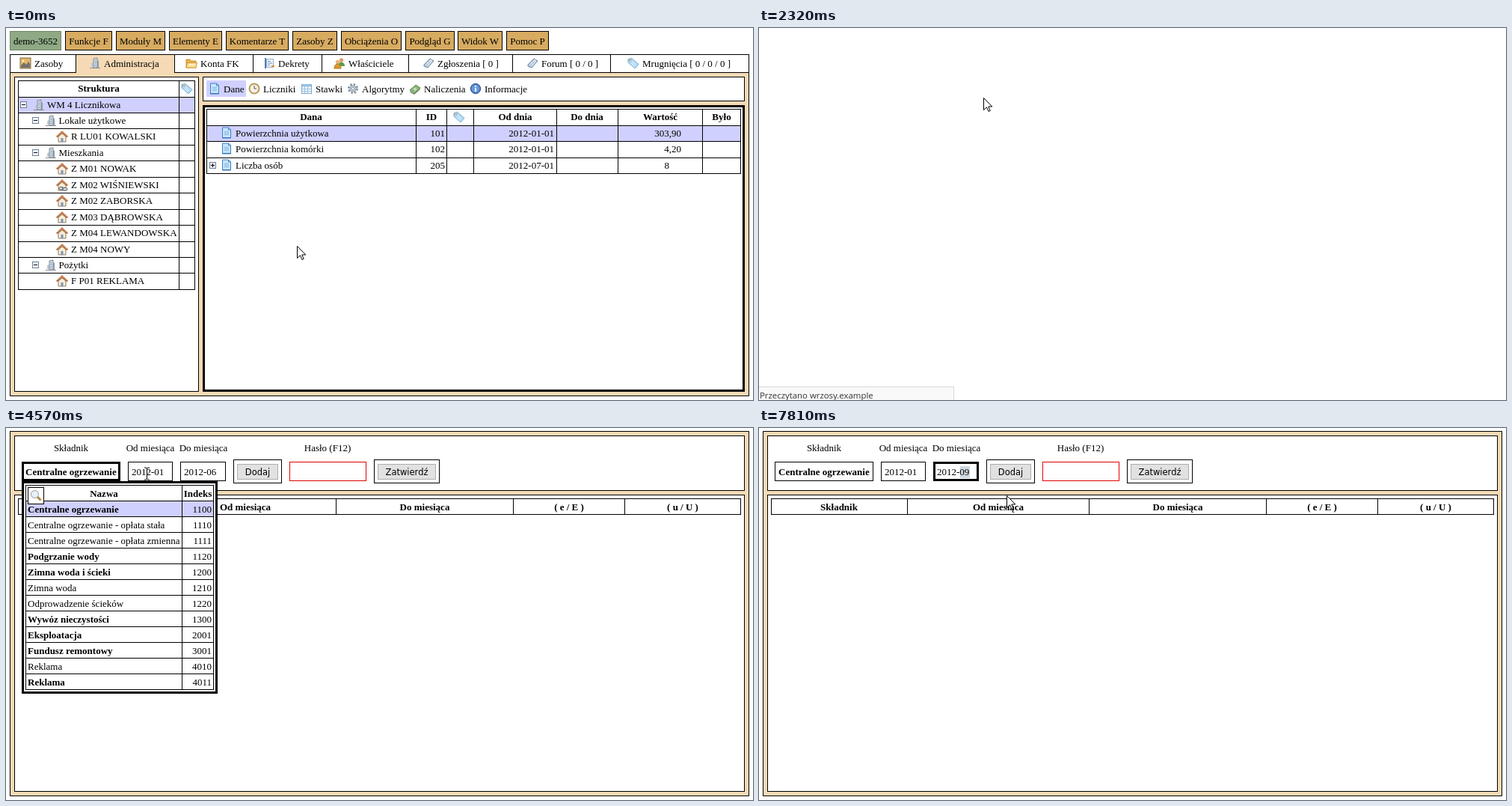
Write an HTML page that moves like this. It is 999 by 497 pixels and loops after 8000 ms.

```html
<!DOCTYPE html>
<html lang="pl">
<head>
<meta charset="utf-8">
<style>
html, body { margin: 0; width: 100%; height: 100%; overflow: hidden; background: #fff; }
svg { display: block; }
text { font: 13px "Liberation Serif", "Times New Roman", serif; white-space: pre; }
.b { font-weight: bold; }
.ui { font: 11.5px "DejaVu Sans", sans-serif; }
.status { font: 11.4px "Open Sans", sans-serif; fill: #333; }
.m { text-anchor: middle; }
.e { text-anchor: end; }
</style>
</head>
<body>
<svg id="stage" width="999" height="497" viewBox="0 0 999 497"></svg>
<script>
const PEACH = '#f5dab5', LILAC = '#d0d0ff', TAN = '#d7ab60';

const icons = {
  building: '<path d="M1 14.5h14" stroke="#8a9098"/><path d="M3 13V8l3-1v6z" fill="#c3cad2"/><path d="M6 14V2l5-1v13z" fill="#dfe6ee" stroke="#7c8794"/><path d="M11 14V4l2 1v9z" fill="#8d99a8"/><path d="M7.5 4h2m-2 2.500h2m-2 2.500h2m-2 2.500h2" stroke="#5d7ea8"/>',
  house: '<path d="M3 8v7h10V8L8 4z" fill="#f6ecd8" stroke="#8f7b62"/><path d="M.8 8.500L8 1.800l7.200 6.700" fill="none" stroke="#a8572b" stroke-width="2.200"/><path d="M1.500 7.600L8 1.600l6.500 6" fill="none" stroke="#e9a15d"/><path d="M6.500 10h3v5h-3z" fill="#7b93b4"/>',
  houseLink: '<use href="#house"/><rect x="4" y="10.500" width="5" height="3.500" rx="1.700" fill="#ddd" stroke="#555"/><rect x="9" y="11.500" width="6" height="3.500" rx="1.700" fill="#ddd" stroke="#555"/>',
  folder: '<path d="M1 3h5l1 2h7v9H1z" fill="#e9b24c" stroke="#c58f31"/><path d="M2.500 7.500h13l-1.500 6.500H1z" fill="#fbdf92" stroke="#d29b3c"/><path d="M5 10h7" stroke="#fff"/>',
  doc: '<path d="M2.500 1h8l3 3v11h-11z" fill="#c7e4fb" stroke="#3b82c4"/><path d="M10.500 1v3h3z" fill="#fff" stroke="#3b82c4"/><path d="M5 6.500h6M5 8.500h6M5 10.500h6" stroke="#84b8e0"/><path d="M2 14.500h12" stroke="#3171b0"/>',
  clock: '<circle cx="8" cy="8" r="6.500" fill="#f5f1e6" stroke="#b99a5a" stroke-width="2"/><path d="M8 4v4h3" fill="none" stroke="#555"/>',
  sheet: '<rect x="1.500" y="2.500" width="13" height="12" fill="#f2f8fd" stroke="#79a9d2"/><path d="M2 4h12" stroke="#9cc4e6" stroke-width="3"/><path d="M2 8.500h12m-12 3h12M5.500 3v11m4-11v11" stroke="#9dbfdd"/>',
  gear: '<circle cx="8" cy="8" r="5.600" fill="none" stroke="#8a97a4" stroke-width="3" stroke-dasharray="2.400 2"/><circle cx="8" cy="8" r="4" fill="#cfd8e0" stroke="#8a97a4"/><circle cx="8" cy="8" r="1.700" fill="#fff" stroke="#8a97a4"/>',
  money: '<path d="M1 10l8-7 6 4-8 8z" fill="#8bb67a" stroke="#5d8b50"/><path d="M1 12l6 3.500 8-7" fill="none" stroke="#76736a"/><circle cx="8" cy="8.800" r="2" fill="#c8dfbd"/>',
  info: '<circle cx="8" cy="8" r="6.700" fill="#4a7fc4" stroke="#2d5594"/><circle cx="8" cy="8" r="5" fill="#6d9bd8"/><path d="M8 7v5M8 4v1.700" stroke="#fff" stroke-width="2"/>',
  tag: '<path d="M1 2.500l5-1 9 8-5 5.500-9-8z" fill="#b5daf4" stroke="#76afd8"/><path d="M6 6l5 4.500M5 8l4 4" stroke="#e8f5fd"/><circle cx="3.500" cy="4" r="1.200" fill="#fff" stroke="#b58a50"/>',
  clip: '<path d="M2 10l8-8 5 3-8 9-5-2z" fill="#b9c9da" stroke="#6b86a5"/><path d="M5 10l5-5m-3 7l5-6" stroke="#eef3f8"/><circle cx="11.500" cy="4.500" r="1" fill="#fff"/>',
  people: '<circle cx="10.500" cy="4" r="2.700" fill="#d9a066"/><path d="M6 12c0-7 9-7 9 0z" fill="#5e9a4c"/><circle cx="5.500" cy="6.500" r="2.700" fill="#e8b67c"/><path d="M1 15c0-8 9-8 9 0z" fill="#d99a2b" stroke="#a87422"/>',
  book: '<path d="M2 1h2v14H2z" fill="#4f7fb5"/><path d="M4.500 2.500h9v11h-9z" fill="#eef4fa" stroke="#98afc6"/><path d="M6 5.500h4M6 8h6M6 10.500h3" stroke="#6c92ba"/><path d="M11 12h4" stroke="#e2942f" stroke-width="2"/>',
  picture: '<rect x="1" y="1" width="14" height="14" fill="#e5b567" stroke="#7f6a48"/><path d="M2 11l4-4 3 3 3-4 2 3v5H2z" fill="#74716c"/><circle cx="5" cy="5" r="1.500" fill="#fff3c4"/>',
  lens: '<path d="M9.500 9.500l5 5" stroke="#b98443" stroke-width="3"/><circle cx="6.500" cy="6.500" r="5" fill="#e6f1fa" stroke="#999"/>',
  add: '<circle cx="12" cy="12" r="3.800" fill="#4aa83c"/><path d="M9.500 12h5M12 9.500v5" stroke="#fff" stroke-width="1.400"/>'
};

const rect = (x, y, x2, y2, fill) =>
  `<rect x="${x}" y="${y}" width="${x2 - x}" height="${y2 - y}" fill="${fill}"/>`;
const box = (x, y, x2, y2, fill = '#fff', w = 1, line = '#000') =>
  rect(x, y, x2, y2, line) + rect(x + w, y + w, x2 - w, y2 - w, fill);
const text = (x, y, s, cls = '', attrs = '') =>
  `<text x="${x}" y="${y}" class="${cls}" ${attrs}>${s}</text>`;
const icon = (name, x, y) => `<use href="#${name}" x="${x}" y="${y}"/>`;
const vline = (x, y, y2) => rect(x, y, x + 1, y2, '#000');
const hline = (x, x2, y) => rect(x, y, x2, y + 1, '#000');
const grid = (xs, ys) =>
  xs.map(x => vline(x, ys[0], ys.at(-1) + 1)).join('') +
  ys.map(y => hline(xs[0], xs.at(-1) + 1, y)).join('');
const lines = (y, n, step) => Array.from({ length: n + 1 }, (_, i) => Math.floor(y + i * step));
const group = (id, body) => `<g id="${id}">${body}</g>`;
const toggle = (x, y, plus) =>
  box(x, y, x + 9, y + 9, '#f4f6fa', 1, '#6f7f95') + hline(x + 2, x + 7, y + 4) +
  (plus ? vline(x + 4, y + 2, y + 7) : '');

function buttonBar() {
  const items = [[79, 142, 'Funkcje F'], [147, 213, 'Moduły M'], [218, 289, 'Elementy E'],
    [294, 378, 'Komentarze T'], [383, 443, 'Zasoby Z'], [448, 529, 'Obciążenia O'],
    [534, 600, 'Podgląd G'], [604, 664, 'Widok W'], [669, 726, 'Pomoc P']];
  return box(5, 4, 74, 30, '#8fa985', 1, '#71866a') + text(39.5, 22, 'demo-3652', 'm') +
    items.map(([a, b, s]) => box(a, 4, b, 30, TAN) + text((a + b) / 2, 22, s, 'm')).join('');
}

function tabs() {
  const items = [[5, 'picture', 18, 'Zasoby'], [93, 'building', 111, 'Administracja'],
    [225, 'folder', 240, 'Konta FK'], [330, 'book', 344, 'Dekrety'],
    [422, 'people', 438, 'Właściciele'], [538, 'clip', 557, 'Zgłoszenia [ 0 ]'],
    [677, 'clip', 696, 'Forum [ 0 / 0 ]'], [808, 'tag', 831, 'Mrugnięcia [ 0 / 0 / 0 ]']];
  return box(5, 35, 994, 60) + box(5, 59, 994, 492, PEACH) + rect(94, 36, 225, 61, PEACH) +
    items.map(([x, ic, ix, s]) => vline(x, 35, 60) + icon(ic, ix, 39) + text(ix + 20, 52, s)).join('');
}

function tree() {
  const rows = [[0, 'WM 4 Licznikowa'], [1, 'Lokale użytkowe'], [2, 'R LU01 KOWALSKI'],
    [1, 'Mieszkania'], [2, 'Z M01 NOWAK'], [2, 'Z M02 WIŚNIEWSKI'], [2, 'Z M02 ZABORSKA'],
    [2, 'Z M03 DĄBROWSKA'], [2, 'Z M04 LEWANDOWSKA'], [2, 'Z M04 NOWY'],
    [1, 'Pożytki'], [2, 'F P01 REKLAMA']];
  const ys = lines(92, 12, 21.45);
  return box(11, 65, 258, 486) + rect(16, 92, 253, 113, LILAC) + grid([16, 231, 252], [70, ...ys]) +
    text(124, 85, 'Struktura', 'b m') + icon('tag', 234, 73) +
    rows.map(([level, s], i) => {
      const y = ys[i], x = 36 + level * 15.5;
      return (level < 2 ? toggle(Math.round(x) - 17, y + 6) : '') +
        icon(level < 2 ? 'building' : i == 5 ? 'houseLink' : 'house', Math.round(x), y + 3) +
        text([55, 70.5, 87][level], y + 15, s);
    }).join('');
}

function dataView() {
  const tools = [['doc', 271, 'Dane'], ['clock', 324, 'Liczniki'], ['sheet', 394, 'Stawki'],
    ['gear', 456, 'Algorytmy'], ['money', 539, 'Naliczenia'], ['info', 620, 'Informacje']];
  const heads = [[408, 'Dana'], [569, 'ID'], [681, 'Od dnia'], [777, 'Do dnia'], [875, 'Wartość'], [957, 'Było']];
  const rows = [['Powierzchnia użytkowa', 101, '2012-01-01', '303,90', 903],
    ['Powierzchnia komórki', 102, '2012-01-01', '4,20', 903],
    ['Liczba osób', 205, '2012-07-01', '8', 887]];
  const ys = [130, 151, 173, 194];
  return box(263, 65, 988, 98) + rect(268, 70, 321, 92, LILAC) +
    tools.map(([ic, x, s]) => icon(ic, x, 73) + text(x + 20, 86, s)).join('') +
    box(263, 103, 988, 486, '#fff', 3) + rect(268, 130, 983, 151, LILAC) +
    grid([268, 548, 589, 625, 736, 818, 931, 982], [108, ...ys]) +
    heads.map(([x, s]) => text(x, 123, s, 'b m')).join('') + icon('tag', 598, 111) +
    rows.map(([name, id, date, value, end], i) => {
      const y = ys[i] + 15;
      return icon('doc', 287, y - 13) + text(307, y, name) + text(587, y, id, 'e') +
        text(733, y, date, 'e') + text(end, y, value, 'e');
    }).join('') + toggle(272, 179, true);
}

function menu() {
  const rows = [['folder', 'Konta należności', 'K'], ['money', 'Terminy rozliczeń liczników', 'L'],
    ['money', 'Terminy rozliczeń kosztów', 'R'], ['folder', 'Konta bankowe', 'B'],
    ['money', 'Terminy płatności', 'T'], ['book', 'Nazwy dokumentów', 'O'],
    ['gear', 'Nazwy typów należności', 'Y'], ['people', 'Konta kontrahentów', 'H']];
  const ys = lines(35, 8, 21.55);
  return box(217, 30, 437, 213) + grid([222, 416, 431], ys) +
    rows.map(([ic, s, key], i) => icon(ic, 225, ys[i] + 4) + (ic == 'book' ? '' : icon('add', 225, ys[i] + 4)) +
      text(245, ys[i] + 16, s) + text(424, ys[i] + 16, key, 'm')).join('');
}

function form() {
  const labels = [[87, 'Składnik'], [193, 'Od miesiąca'], [264, 'Do miesiąca'], [430, 'Hasło (F12)']];
  const heads = [[107, 'Składnik'], [320, 'Od miesiąca'], [560, 'Do miesiąca'], [753, '( e / E )'], [905, '( u / U )']];
  const button = (x, x2, s) => box(x, 42, x2, 74) + box(x + 5, 48, x2 - 5, 69, '#e1e1e1', 1, '#adadad') +
    text((x + x2) / 2, 63, s, 'ui m');
  const field = (id, x, x2) => box(x, 45, x2, 71) + group(id, box(x, 45, x2, 71, '#fff', 3));
  return box(5, 4, 994, 492, PEACH) + box(11, 10, 988, 84) + box(11, 89, 988, 486) +
    labels.map(([x, s]) => text(x, 31, s, 'm')).join('') +
    field('focusPart', 21, 153) + text(26, 63, 'Centralne ogrzewanie', 'b') +
    field('focusFrom', 163, 223) + group('pickFrom', rect(198, 51, 211, 67, '#d0d8e0')) + text(168, 63, '2012-01') +
    field('focusTo', 233, 294) + group('pickTo', rect(269, 51, 282, 67, '#d0d8e0')) + text(238, 63, '2012-06', '', 'id="to"') +
    button(304, 369, 'Dodaj') + box(379, 45, 482, 71, '#fff', 1, '#e00000') + button(492, 580, 'Zatwierdź') +
    grid([16, 198, 441, 678, 827, 982], [94, 115]) +
    heads.map(([x, s]) => text(x, 110, s, 'b m')).join('');
}

function picker() {
  const rows = [['Centralne ogrzewanie', 1100, 'b'], ['Centralne ogrzewanie - opłata stała', 1110],
    ['Centralne ogrzewanie - opłata zmienna', 1111], ['Podgrzanie wody', 1120, 'b'],
    ['Zimna woda i ścieki', 1200, 'b'], ['Zimna woda', 1210], ['Odprowadzenie ścieków', 1220],
    ['Wywóz nieczystości', 1300, 'b'], ['Eksploatacja', 2001, 'b'], ['Fundusz remontowy', 3001, 'b'],
    ['Reklama', 4010], ['Reklama', 4011, 'b']];
  const ys = lines(97, 12, 21);
  return box(21, 71, 283, 355, '#fff', 3) + rect(26, 97, 278, 118, LILAC) + grid([26, 235, 277], [76, ...ys]) +
    text(131, 92, 'Nazwa', 'b m') + text(256.5, 92, 'Indeks', 'b m') +
    rows.map(([s, n, cls], i) => text(29, ys[i] + 16, s, cls) + text(275, ys[i] + 16, n, 'e')).join('') +
    group('search', box(29, 79, 51, 102) + icon('lens', 32, 82));
}

const stage = document.getElementById('stage');
stage.innerHTML =
  '<defs>' + Object.entries(icons).map(([id, body]) => group(id, body)).join('') + '</defs>' +
  group('main', buttonBar() + tabs() + tree() + dataView() + group('menu', menu())) +
  group('entry', form() + group('picker', picker())) +
  group('status', box(-1, 479, 261, 499, '#f9f9f9', 1, '#d8d8d8') + text(1, 495, 'Przeczytano wrzosy.example', 'status')) +
  group('cursor',
    group('ring', '<circle r="11" fill="none" stroke="#000" stroke-width="1.500"/><circle r="9.800" fill="none" stroke="#fff"/>') +
    group('arrow', '<path d="M.5.5v16l4-3.700 2.500 5.700 2.200-1-2.400-5.500h5z" fill="#fff" stroke="#000"/>') +
    group('beam', '<path d="M-3.500-7.500h2.500l1 1 1-1h2.500M0-6.500v14M-3.500 8.500h2.500l1-1 1 1h2.500" transform="translate(.5 -.5)" fill="none" stroke="#000"/>'));

const part = {};
stage.querySelectorAll('[id]').forEach(el => part[el.id] = el);
const show = (id, on) => part[id].style.display = on ? '' : 'none';

// first step, last step, step count, goal x, goal y
const moves = [
  [70, 690, 9, 261, 10], [840, 840, 1, 267, 22], [1390, 1850, 7, 302, 94],
  [2320, 2320, 1, 300, 93], [3020, 3330, 5, 149, 103], [3405, 3560, 3, 136, 108],
  [4110, 4570, 7, 188, 61], [4650, 4650, 1, 185, 60], [4800, 4960, 3, 202, 60],
  [5490, 6180, 10, 277, 58], [6590, 6740, 3, 330, 90], [6970, 6970, 1, 331, 90]];
const clicks = [[2170, 2250], [3710, 3880], [4650, 4800], [5030, 5180], [5260, 5490], [6350, 6420]];

function pointer(t) {
  let x = 389, y = 291;
  for (const [from, to, n, gx, gy] of moves) {
    if (t < from) break;
    const k = t >= to ? n : 1 + Math.floor((t - from) / (to - from) * (n - 1) + 0.02);
    const p = k / n, e = p * p * (3 - 2 * p);
    x += (gx - x) * e;
    y += (gy - y) * e;
  }
  return [Math.round(x), Math.round(y)];
}

function draw(t) {
  const within = (a, b) => t >= a && t < b;
  const [x, y] = pointer(t);
  const beam = y < 72 || within(840, 2320);
  part.cursor.setAttribute('transform', `translate(${x} ${y})`);
  show('beam', beam);
  show('arrow', !beam);
  show('ring', clicks.some(c => within(...c)));

  show('main', t < 2320);
  show('menu', t >= 840);
  show('status', within(2320, 2470));
  show('entry', t >= 2400);
  show('picker', t < 4650);
  show('search', x >= 283 || y < 72);
  show('focusPart', t < 4650);
  show('focusFrom', within(4650, 6350));
  show('pickFrom', within(5180, 6350));
  show('focusTo', t >= 6350);
  show('pickTo', t >= 6420);
  part.to.textContent = '2012-0' + (6 + [7430, 7580, 7810].filter(s => t >= s).length);
}

let start;
function tick(now) {
  start ??= now;
  draw((now - start) % 8000);
  requestAnimationFrame(tick);
}
draw(0);
requestAnimationFrame(tick);
</script>
</body>
</html>
```
